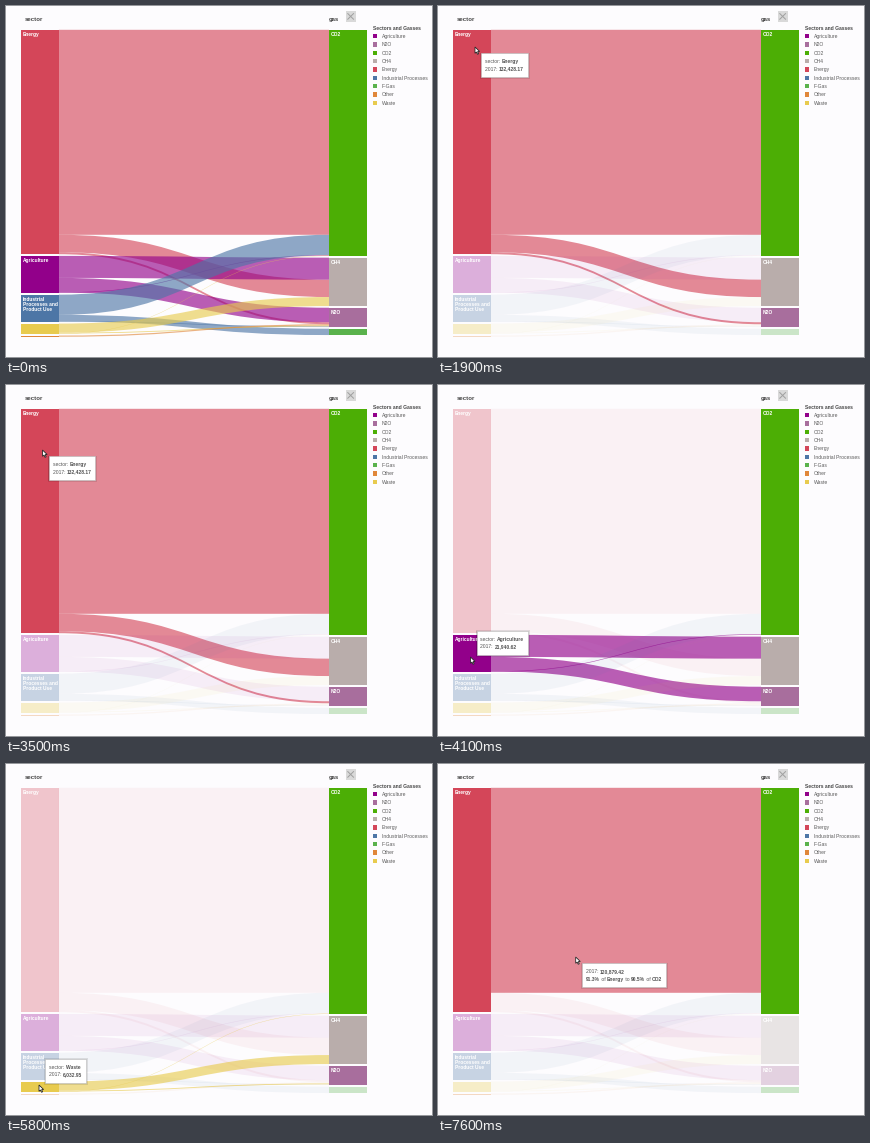
A matplotlib script for the animation above (8000 ms loop, 426x351 px).

```python
import matplotlib.pyplot as plt
import numpy as np
from matplotlib.animation import FuncAnimation
from matplotlib.patches import PathPatch, Polygon, Rectangle
from matplotlib.path import Path

W, H, DPI = 426, 351, 100
STEP, LOOP = 100, 8000
TOP, GAP, NODE_W = 23.8, 1.7, 37.5
LEFT_X, RIGHT_X = 15, 323
LINK_ALPHA, DIM_NODE, DIM_LINK = 0.63, 0.3, 0.06

COLORS = {
    "Agriculture": "#92008a", "N2O": "#a86e9d", "CO2": "#4cae05",
    "CH4": "#b9adab", "Energy": "#d44659", "Industrial Processes": "#4d76a6",
    "F-Gas": "#5ab24c", "Other": "#e0873a", "Waste": "#e8cb4e",
}
IND = "Industrial Processes"
SECTORS = ["Energy", "Agriculture", IND, "Waste", "Other"]
GASES = ["CO2", "CH4", "N2O", "F-Gas"]
LINKS = {
    ("Energy", "CO2"): 205, ("Energy", "CH4"): 17.4, ("Energy", "N2O"): 2,
    ("Agriculture", "CH4"): 22, ("Agriculture", "N2O"): 14.5,
    ("Agriculture", "CO2"): 0.6,
    (IND, "CO2"): 20.2, (IND, "F-Gas"): 6.3, (IND, "N2O"): 0.7,
    ("Waste", "CH4"): 9, ("Waste", "N2O"): 0.9, ("Waste", "CO2"): 0.35,
    ("Other", "N2O"): 1.2,
}
LABELS = {
    "Energy": "Energy", "Agriculture": "Agriculture",
    IND: "Industrial|Processes and|Product Use",
    "CO2": "CO2", "CH4": "CH4", "N2O": "N2O",
}

# (ms, x, y) of the pointer tip
POINTER = [
    (1400, 92, 60), (1600, 57, 44.5), (1800, 37, 41), (3400, 37, 41),
    (3900, 32.5, 272), (4800, 32.5, 272), (5100, 33, 301), (5300, 33, 301),
    (5500, 33, 321), (6300, 33, 321), (6600, 137.7, 195.5),
    (7100, 137.7, 195.5), (7300, 137.7, 193),
]
FLOW = ("Energy", "CO2")
HOVERS = [
    (0, None), (1700, "Energy"), (3800, "Agriculture"), (5000, IND),
    (5500, "Waste"), (6400, None), (7300, FLOW),
]

plt.rcParams["font.family"] = "Liberation Sans"
fig = plt.figure(figsize=(W / DPI, H / DPI), dpi=DPI, facecolor="#fdfcfe")
ax = fig.add_axes([0, 0, 1, 1])
ax.set_xlim(0, W)
ax.set_ylim(H, 0)
ax.axis("off")


def px(size):
    return size * 72 / DPI


def write(x, y, s, size=5, color="#5c5c5c", bold=False, z=5):
    return ax.text(x, y, s, fontsize=px(size), color=color, zorder=z,
                   weight="bold" if bold else "normal", va="baseline")


def box(x, y, w, h, color, z=3, **kw):
    kw.setdefault("lw", 0)
    return ax.add_patch(Rectangle((x, y), w, h, fc=color, zorder=z, **kw))


def stack(names, side):
    """Lay out one column; return node spans and the top of each link."""
    y, spans, tops = TOP, {}, {}
    for name in names:
        start = y
        mine = [k for k in LINKS if k[side] == name]
        for key in sorted(mine, key=LINKS.get, reverse=True):
            tops[key] = y
            y += LINKS[key]
        spans[name] = (start, y - start)
        y += GAP
    return spans, tops


def ribbon(y0, y1, size, color):
    a, b = LEFT_X + NODE_W + 0.4, RIGHT_X
    m = (a + b) / 2
    verts = [(a, y0), (m, y0), (m, y1), (b, y1), (b, y1 + size),
             (m, y1 + size), (m, y0 + size), (a, y0 + size), (a, y0)]
    codes = [Path.MOVETO] + [Path.CURVE4] * 3 + [Path.LINETO]
    codes += [Path.CURVE4] * 3 + [Path.CLOSEPOLY]
    patch = PathPatch(Path(verts, codes), fc=color, lw=0, alpha=LINK_ALPHA, zorder=2)
    return ax.add_patch(patch)


# diagram
left, left_tops = stack(SECTORS, 0)
right, right_tops = stack(GASES, 1)
links = {k: ribbon(left_tops[k], right_tops[k], size, COLORS[k[0]])
         for k, size in LINKS.items()}
nodes = {}
for x, spans in ((LEFT_X, left), (RIGHT_X, right)):
    for name, (y, h) in spans.items():
        nodes[name] = box(x, y, NODE_W, h, COLORS[name])
        for i, line in enumerate(LABELS.get(name, "").split("|")):
            write(x + 2, y + 6.3 + 4.9 * i, line, 4.85, "white", True)

# headers, close button and legend
write(19, 15.4, "sector", 6, "#484848", True)
write(322.5, 15.4, "gas", 6, "#484848", True)
box(339.5, 5.3, 10.3, 10.2, "#d9d9d9")
for ys in ((7.6, 13.2), (13.2, 7.6)):
    ax.plot((341.8, 347.5), ys, color="#a0a0a0", lw=px(1), zorder=4)
write(367, 23.9, "Sectors and Gasses", 5, "#484848", True)
for i, (name, color) in enumerate(COLORS.items()):
    y = 30.2 + 8.32 * i
    box(367, y - 2.1, 4.2, 4.2, color)
    write(375.6, y + 1.8, name)


def make_tip(*lines):
    """Each line is plain and *bold* runs separated by asterisks."""
    parts, widest = [], 0
    for row, line in enumerate(lines):
        x = 4
        for i, run in enumerate(line.split("*")):
            if not run:
                continue
            t = write(0, 0, run, 5, "#555555", i % 2 == 1, z=9)
            parts.append((t, x, 9.8 + 7.5 * row))
            x += t.get_window_extent().width * W / fig.bbox.width
        widest = max(widest, x)
    w, h = widest + 4, 23.5
    for grow in (0.6, 1.3):
        shade = box(0, 0, w + 2 * grow, h + 2 * grow, "black", 7, alpha=0.1)
        parts.append((shade, 0.5 - grow, 0.7 - grow))
    frame = box(0, 0, w, h, "white", 8, ec="#c4c4c4", lw=px(0.6))
    parts.append((frame, 0, 0))
    return parts


def sector_tip(name, value):
    return make_tip(f"sector: *{name}*", f"2017: *{value}*")


tips = {
    "Energy": sector_tip("Energy", "132,428.17"),
    "Agriculture": sector_tip("Agriculture", "21,940.62"),
    IND: sector_tip("Industrial Processes and Product Use", "16,104.38"),
    "Waste": sector_tip("Waste", "6,032.95"),
    FLOW: make_tip("2017: *120,879.42*",
                   "*91.3%* of *Energy* to *90.5%* of *CO2*"),
}

ARROW = np.array([(0, 0), (0, 6.3), (1.5, 5), (2.5, 7.3), (3.6, 6.8),
                  (2.6, 4.6), (4.6, 4.5)])
pointer = ax.add_patch(Polygon(ARROW, fc="white", ec="#222222",
                               lw=px(0.8), zorder=10))


def pointer_at(ms):
    if ms >= POINTER[-1][0]:
        return POINTER[-1][1:]
    for (t0, x0, y0), (t1, x1, y1) in zip(POINTER, POINTER[1:]):
        if t0 <= ms < t1:
            u = (ms - t0) / (t1 - t0)
            u = u * u * (3 - 2 * u)
            return x0 + (x1 - x0) * u, y0 + (y1 - y0) * u
    return None


def highlight(hover):
    lit = {k for k in LINKS if hover is None or hover == k or hover == k[0]}
    active = {name for k in lit for name in k}
    for k, patch in links.items():
        patch.set_alpha(LINK_ALPHA if k in lit else DIM_LINK)
    for name, patch in nodes.items():
        patch.set_alpha(1 if name in active else DIM_NODE)


def draw(i):
    ms = i * STEP
    hover = [h for t, h in HOVERS if t <= ms][-1]
    highlight(hover)
    pos = pointer_at(ms)
    pointer.set_visible(pos is not None)
    if pos:
        pointer.set_xy(ARROW + pos)
    for key, parts in tips.items():
        for artist, dx, dy in parts:
            artist.set_visible(key == hover)
            if key == hover:
                above = pos[1] > 230
                artist.set_x(pos[0] + 6 + dx)
                artist.set_y(pos[1] + (-26 if above else 6.3) + dy)
    return []


anim = FuncAnimation(fig, draw, frames=LOOP // STEP, interval=STEP,
                     init_func=lambda: draw(0), repeat=True, repeat_delay=0)
plt.show()
```
